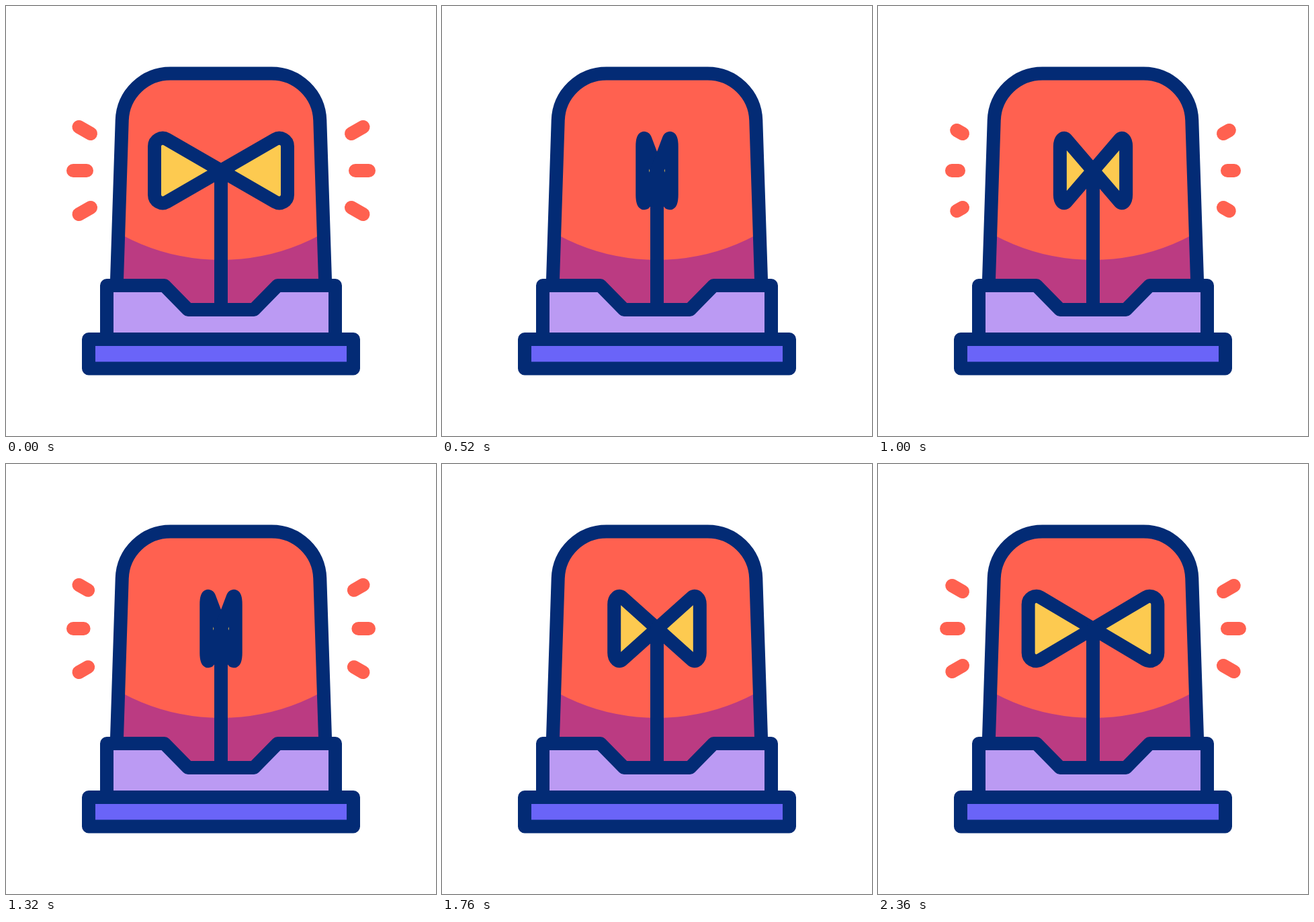
Write an HTML page with a canvas that moves like this. It is 640 px wide and 640 px high and loops after 2.4 s.

```html
<!DOCTYPE html>
<html lang="en">
<head>
<meta charset="utf-8">
<title>Siren</title>
<style>
  html, body { margin: 0; width: 100%; height: 100%; overflow: hidden; background: #fff; }
  canvas { display: block; width: 640px; height: 640px; }
</style>
</head>
<body>
<canvas id="stage" width="640" height="640"></canvas>
<script>
const ctx = document.getElementById('stage').getContext('2d');
const TICK = 40, TICKS = 60, CX = 320, CY = 245;
const NAVY = '#032b75', CORAL = '#ff6150', SHADE = '#bb3b82',
      YELLOW = '#fdca50', LILAC = '#bb9af3', VIOLET = '#6a64f8';

const ease = x => {
  x = Math.min(1, Math.max(0, x));
  return x * x * (3 - 2 * x);
};

function polygon(points) {
  const path = new Path2D();
  points.forEach(([x, y]) => path.lineTo(x, y));
  path.closePath();
  return path;
}

const dome = new Path2D();
dome.moveTo(164.7, 416);
dome.arcTo(175, 100.5, CX, 100.5, 72);
dome.arcTo(465, 100.5, 475.3, 416, 72);
dome.lineTo(475.3, 416);
dome.lineTo(475.3, 460);
dome.lineTo(164.7, 460);
dome.closePath();

const collar = polygon([
  [150, 496], [150, 416], [235.7, 416], [271, 452],
  [369, 452], [404.3, 416], [490, 416], [490, 496]
]);
const base = polygon([[123, 496], [517, 496], [517, 539.5], [123, 539.5]]);

// One reflector wing, relative to the hub, pointing right
const wing = new Path2D();
wing.moveTo(0, 0);
wing.arcTo(99, -57.2, 99, 0, 12.2);
wing.arcTo(99, 57.2, 0, 0, 12.2);
wing.closePath();

function outlined(path, fill) {
  ctx.fillStyle = fill;
  ctx.fill(path);
  ctx.stroke(path);
}

function drawDome() {
  ctx.save();
  ctx.clip(dome);
  ctx.fillStyle = SHADE;
  ctx.fillRect(140, 90, 360, 380);
  ctx.fillStyle = CORAL;
  ctx.beginPath();
  ctx.arc(CX, 68, 310, 0, 2 * Math.PI);
  ctx.fill();
  ctx.restore();
  ctx.stroke(dome);
}

function drawReflector(tick) {
  const turn = (tick % 20) / 10;
  const width = Math.max(0.001, turn < 1 ? 1 - ease(turn) : ease(turn - 1));
  for (const side of [-1, 1]) {
    const path = new Path2D();
    path.addPath(wing, new DOMMatrix([side * width, 0, 0, 1, CX, CY]));
    outlined(path, YELLOW);
  }
  ctx.fillStyle = NAVY;
  ctx.fillRect(CX - 10, CY, 20, 452 - CY);
}

// Rays retract outwards, pause, then grow from the inner end
function drawRays(tick) {
  const [shrinkAt, growAt] = tick < 30 ? [0, 20] : [30, 51];
  let inner = 0, outer = 1;
  if (tick < growAt) inner = ease((tick - shrinkAt) / 10);
  else outer = ease((tick - growAt) / 10);
  if (outer - inner < 0.0005) return;

  ctx.strokeStyle = CORAL;
  ctx.beginPath();
  for (const side of [-1, 1]) {
    for (const row of [-1, 0, 1]) {
      const x = row ? 194 : 200, y = row * 55;
      const dx = row ? 17.5 : 20, dy = row * 10;
      const point = k => [CX + side * (x + dx * k), CY + y + dy * k];
      ctx.moveTo(...point(inner));
      ctx.lineTo(...point(outer));
    }
  }
  ctx.lineCap = 'round';
  ctx.stroke();
}

function draw(ms) {
  const tick = (ms / TICK) % TICKS;
  ctx.fillStyle = '#fff';
  ctx.fillRect(0, 0, 640, 640);
  ctx.lineWidth = 20;
  ctx.lineJoin = 'round';
  ctx.lineCap = 'butt';
  ctx.strokeStyle = NAVY;
  drawDome();
  drawReflector(tick);
  outlined(collar, LILAC);
  outlined(base, VIOLET);
  drawRays(tick);
}

function loop() {
  draw(performance.now());
  requestAnimationFrame(loop);
}
loop();
</script>
</body>
</html>
```
